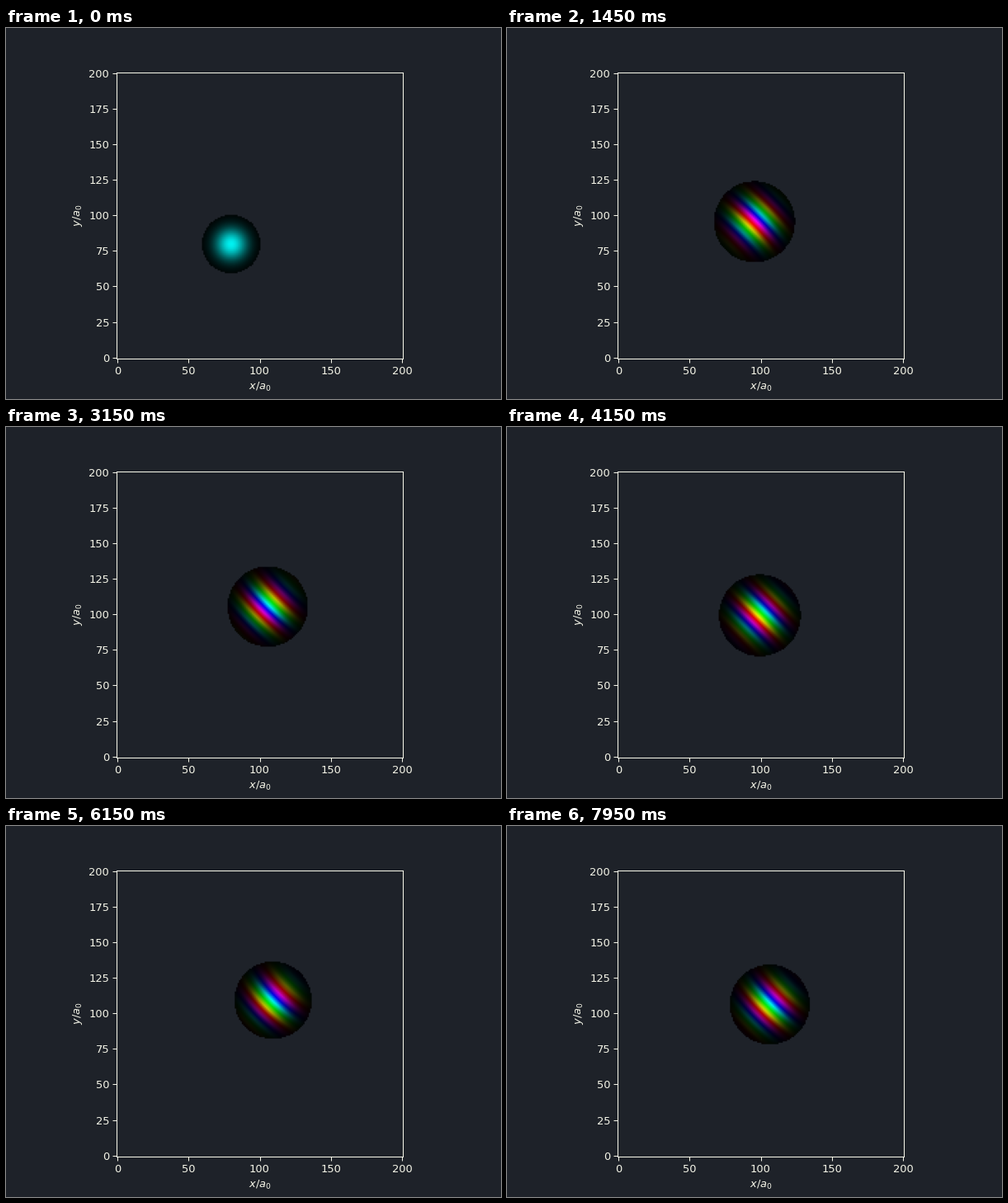
These frames come from a looping animation (600x450 px, 8 s). A matplotlib script:

```python
import numpy as np
import matplotlib.pyplot as plt
from matplotlib.animation import FuncAnimation
from matplotlib.colors import hsv_to_rgb

BG, FG = "#1e2229", "#f5f5e8"
FRAMES, STEP = 160, 50

# Displaced, squeezed Gaussian packet in a 2D harmonic well
N, MID, AMP = 201, 100, 20
OMEGA = 3.40            # rad per second
LEN2 = 80.0             # oscillator length squared
SQUEEZE = 1.4           # widest / narrowest width
S02 = LEN2 / SQUEEZE    # initial width squared
PEAK, CUTOFF = 0.95, 0.025

X, Y = np.meshgrid(np.arange(N), np.arange(N))


def packet(t):
    """Relative magnitude and phase of the wave function at t seconds."""
    tau = OMEGA * t
    c, s = np.cos(tau), np.sin(tau)
    dx, dy = X - (MID - AMP * c), Y - (MID - AMP * c)
    r2 = dx**2 + dy**2

    spread = c**2 + SQUEEZE**2 * s**2
    magnitude = np.exp(-r2 / (2 * S02 * spread))

    chirp = (SQUEEZE**2 - 1) * s * c / spread / LEN2
    action = -AMP**2 / (2 * LEN2) * np.sin(2 * tau)
    gouy = np.arctan2(SQUEEZE * s, c)
    phase = AMP * s / LEN2 * (dx + dy) + chirp * r2 / 2 + action - gouy
    return magnitude, phase


def colorize(magnitude, phase):
    """Hue shows the phase, brightness the magnitude."""
    hue = (0.5 + phase / (2 * np.pi)) % 1
    hsv = np.stack([hue, np.ones_like(hue), PEAK * magnitude], axis=-1)
    alpha = (magnitude > CUTOFF).astype(float)
    return np.dstack([hsv_to_rgb(hsv), alpha])


plt.rcParams.update({
    "font.family": "DejaVu Sans",
    "text.color": FG,
    "axes.labelcolor": FG,
    "axes.edgecolor": FG,
    "xtick.color": FG,
    "ytick.color": FG,
})

fig, ax = plt.subplots(figsize=(6.4, 4.8), dpi=93.75, facecolor=BG)
ax.set_facecolor(BG)
image = ax.imshow(colorize(*packet(0)), origin="lower")
ax.set_xticks(range(0, 201, 50))
ax.set_yticks(range(0, 201, 25))
ax.set_xlabel("$x/a_0$")
ax.set_ylabel("$y/a_0$")


def update(i):
    image.set_data(colorize(*packet(i * STEP / 1000)))
    return [image]


anim = FuncAnimation(fig, update, frames=FRAMES, interval=STEP,
                     repeat=True, repeat_delay=0)
plt.show()
```
